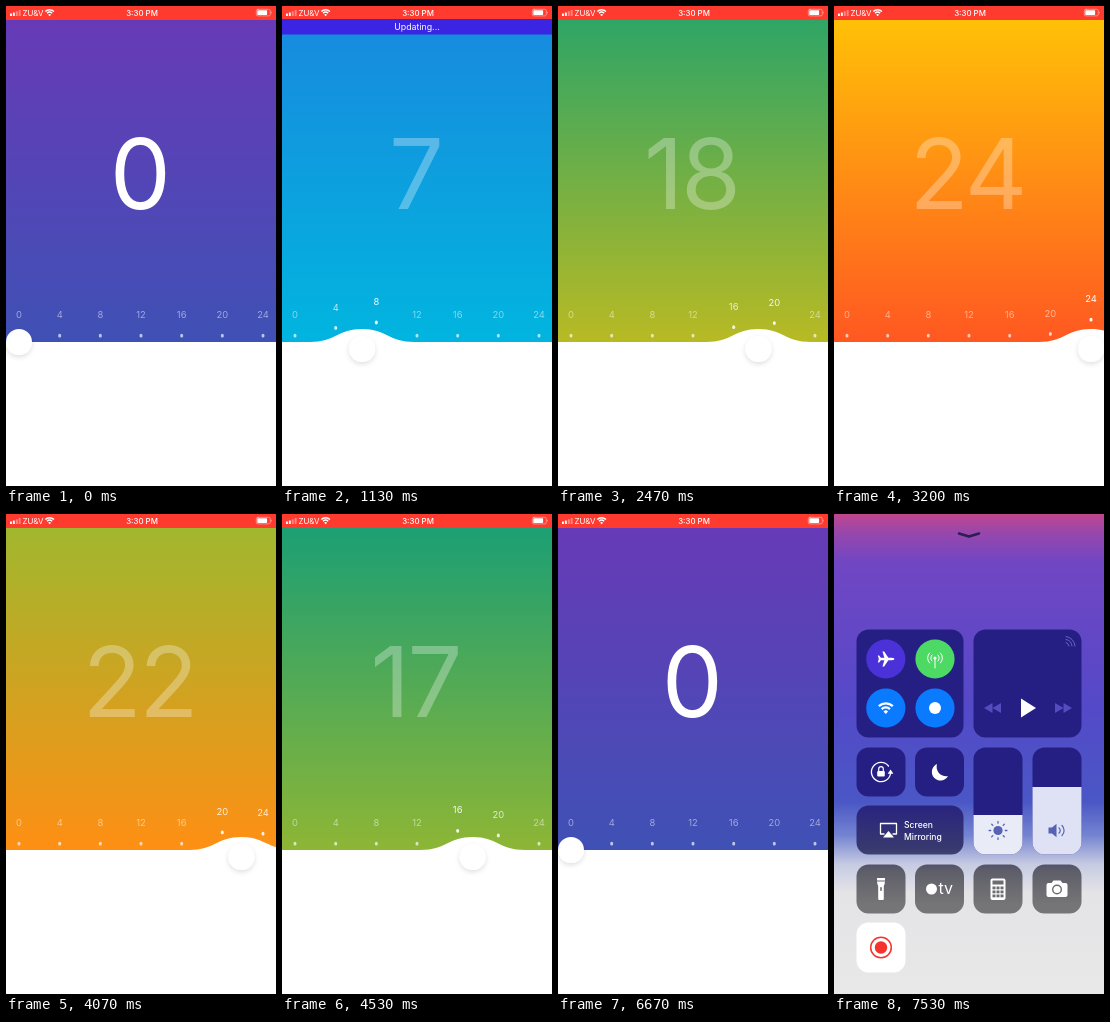
Animation, 270 px wide and 480 px high, one loop 7.59 s. Source, as an HTML page:

```html
<!DOCTYPE html>
<html lang="en">
<head>
<meta charset="utf-8">
<title>Liquid slider</title>
<style>
html, body { margin: 0; height: 100%; overflow: hidden; background: #fff; }
svg { display: block; width: 100vw; height: 100vh; }
text { font-family: Inter, Roboto, sans-serif; fill: #fff; }
.mid { text-anchor: middle; }
#value { font-size: 97px; font-weight: 400; letter-spacing: -2.5px; }
#ticks text { font-size: 9.4px; }
.bar { font-size: 7.9px; }
.tile { fill: url(#glass); }
.gray { fill: #6c6c70; }
.w { fill: #fff; }
.line { fill: none; stroke: #fff; stroke-width: 1.3; stroke-linecap: round; stroke-linejoin: round; }
.ink { fill: #5663b4; }
.dim { fill: #554bbd; }
</style>
</head>
<body>
<svg viewBox="0 0 270 480" preserveAspectRatio="none">
  <defs>
    <linearGradient id="sky" gradientUnits="userSpaceOnUse" x1="0" y1="13" x2="0" y2="338">
      <stop id="top"/><stop id="low" offset="1"/>
    </linearGradient>
    <linearGradient id="veil" x2="0" y2="1">
      <stop stop-color="#c0468e"/>
      <stop offset=".04" stop-color="#9747ac"/>
      <stop offset=".1" stop-color="#7146c3"/>
      <stop offset=".4" stop-color="#5449c8"/>
      <stop offset=".6" stop-color="#4a57c5"/>
      <stop offset=".67" stop-color="#7584d1"/>
      <stop offset=".73" stop-color="#c6cbe2"/>
      <stop offset=".79" stop-color="#e4e4e7"/>
      <stop offset="1" stop-color="#e8e8e8"/>
    </linearGradient>
    <linearGradient id="glass" gradientUnits="userSpaceOnUse" x1="0" y1="280" x2="0" y2="390">
      <stop stop-color="#251f84"/>
      <stop offset=".5" stop-color="#38396f"/>
      <stop offset=".7" stop-color="#5e5e69"/>
      <stop offset="1" stop-color="#757577"/>
    </linearGradient>
    <filter id="shade" x="-60%" y="-60%" width="220%" height="220%">
      <feDropShadow dx="0" dy="2" stdDeviation="2.6" flood-opacity=".13"/>
    </filter>
    <clipPath id="bright"><rect x="139.5" y="233.5" width="49" height="107" rx="12"/></clipPath>
    <clipPath id="sound"><rect x="198.5" y="233.5" width="49" height="107" rx="12"/></clipPath>
    <g id="wifi">
      <path class="line" style="stroke-width:2.4;stroke-linecap:butt" d="M-7.6-2A11 11 0 0 1 7.6-2M-4.5 1.2A6.5 6.5 0 0 1 4.5 1.2"/>
      <path class="w" d="M0 6.6L-2.5 3.8A3.4 3.4 0 0 1 2.5 3.8Z"/>
    </g>
  </defs>

  <rect width="270" height="340" fill="url(#sky)"/>
  <text id="value" class="mid" x="133.2" y="203"></text>
  <g id="ticks"></g>
  <path id="wave" class="w"/>
  <circle id="knob" class="w" r="13" filter="url(#shade)"/>

  <rect width="270" height="14" fill="#ff3b30"/>
  <path class="w" d="M4 7.6h1.9v2.4h-1.9zM6.9 6.4h1.9v3.6h-1.9z"/>
  <path class="w" opacity=".4" d="M9.8 5.2h1.9v4.8h-1.9zM12.7 4h1.9v6h-1.9z"/>
  <text class="bar" x="16.5" y="9.8">ZU&amp;V</text>
  <use href="#wifi" transform="translate(43.6 6.6) scale(.57)"/>
  <text class="bar mid" x="136" y="9.8" font-weight="500">3:30 PM</text>
  <rect class="line" x="250.3" y="3.3" width="14" height="6.6" rx="1.6" style="stroke-width:.6" opacity=".7"/>
  <rect class="w" x="251.3" y="4.3" width="9.8" height="4.6" rx=".7"/>
  <path class="w" d="M265 5.4q1.4 1.2 0 2.4z" opacity=".7"/>
  <g id="update">
    <rect y="13" width="270" height="15.5" fill="#3a25e2"/>
    <text class="mid" x="135" y="23.8" font-size="8.8">Updating...</text>
  </g>

  <g id="panel">
    <rect width="270" height="480" fill="url(#veil)"/>
    <g id="tiles">
      <path d="M125 19.5L135 22.6L145 19.5" fill="none" stroke="#2c1d55" stroke-width="2.6" stroke-linecap="round" stroke-linejoin="round"/>
      <g class="tile">
        <rect x="22.5" y="115.5" width="107" height="108" rx="12"/>
        <rect x="139.5" y="115.5" width="108" height="108" rx="12"/>
        <rect x="22.5" y="233.5" width="49" height="49" rx="12"/>
        <rect x="81" y="233.5" width="49" height="49" rx="12"/>
        <rect x="22.5" y="291.5" width="107" height="49" rx="12"/>
        <rect x="22.5" y="350.5" width="49" height="49" rx="12"/>
        <rect x="81" y="350.5" width="49" height="49" rx="12"/>
        <rect x="139.5" y="350.5" width="49" height="49" rx="12"/>
        <rect x="198.5" y="350.5" width="49" height="49" rx="12"/>
      </g>
      <g fill="#251f84">
        <rect x="139.5" y="233.5" width="49" height="107" rx="12"/>
        <rect x="198.5" y="233.5" width="49" height="107" rx="12"/>
      </g>
      <rect class="w" x="22.5" y="408.5" width="49" height="50" rx="12"/>

      <circle cx="51.8" cy="145" r="19.6" fill="#4a32d8"/>
      <circle cx="101" cy="145" r="19.6" fill="#4cd964"/>
      <circle cx="51.8" cy="194" r="19.6" fill="#0a7aff"/>
      <circle cx="101" cy="194" r="19.6" fill="#0a7aff"/>
      <path class="w" transform="translate(51.8 145) scale(.8)" d="M11 0Q10-1.7 7-1.7H3.2L-2-9.5H-4.2L-1.8-1.7H-6.2L-8.3-4.4H-10L-8.7 0L-10 4.4H-8.3L-6.2 1.7H-1.8L-4.2 9.5H-2L3.2 1.7H7Q10 1.7 11 0Z"/>
      <g transform="translate(101 145)">
        <path class="line" style="stroke-width:1" d="M0-1V9M-3-4A4.2 4.2 0 0 0-3 2M3-4A4.2 4.2 0 0 1 3 2M-5.4-6A7 7 0 0 0-5.4 4M5.4-6A7 7 0 0 1 5.4 4"/>
        <circle class="w" cy="-1" r="1.6"/>
      </g>
      <use href="#wifi" transform="translate(51.8 194) scale(.92)"/>
      <circle class="w" cx="101" cy="194" r="6"/>

      <path class="w" d="M187 184.5L202 194L187 203.5Z"/>
      <path class="dim" d="M158.5 189V199L150 194ZM167 189V199L158.5 194ZM221 189V199L229.5 194ZM229.5 189V199L238 194Z"/>
      <path class="line" style="stroke:#6b60c8;stroke-width:1" d="M232 128.5A4 4 0 0 1 235 132M232 125.5A7 7 0 0 1 238 132M232 122.5A10 10 0 0 1 241 132"/>

      <g transform="translate(47 258)">
        <path class="line" d="M7.5-6A9.6 9.6 0 1 0 9.6 1"/>
        <path class="w" d="M6.6 1.8L12.4 1.8L9.6-2.4Z"/>
        <rect class="w" x="-3.8" y="-1" width="7.6" height="5.6" rx="1"/>
        <path class="line" style="stroke-width:1.2" d="M-2.3-1V-3A2.3 2.3 0 0 1 2.3-3V-1"/>
      </g>
      <path class="w" d="M103 250A8.6 8.6 0 1 0 114 262A9.4 9.4 0 0 1 103 250Z"/>

      <path class="line" d="M50 320H46.5V309.5H62.5V320H59"/>
      <path class="w" d="M54.5 317L60 323.5H49Z"/>
      <g font-size="8.6" font-weight="500"><text x="70" y="313.5">Screen</text><text x="70" y="325.5">Mirroring</text></g>

      <rect x="139" y="301" width="50" height="40" fill="#e9ebf7" clip-path="url(#bright)"/>
      <rect x="198" y="273" width="50" height="68" fill="#dfe2f5" clip-path="url(#sound)"/>
      <circle class="ink" cx="164" cy="316.5" r="4.6"/>
      <g id="rays" stroke="#5663b4" stroke-width="1.3" stroke-linecap="round"></g>
      <path class="ink" d="M214.5 313.5H218L222.5 309.8V323.2L218 319.5H214.5Z"/>
      <path class="line" style="stroke:#5663b4;stroke-width:1.2" d="M225 313.8A4 4 0 0 1 225 319.2M228 311.5A7 7 0 0 1 228 321.5"/>

      <path class="w" d="M43 364H51V366.5H43ZM43 367.5H51Q50.8 370.5 49.8 372V385Q49.8 386 48.8 386H45.2Q44.2 386 44.2 385V372Q43.2 370.5 43 367.5Z"/>
      <rect class="gray" x="46.2" y="373" width="1.6" height="4" rx=".8"/>
      <circle class="w" cx="97.5" cy="375" r="5.5"/>
      <text x="104.5" y="380" font-size="16">tv</text>
      <rect class="w" x="156.5" y="364.5" width="15" height="21.5" rx="2"/>
      <rect class="gray" x="158.5" y="366.5" width="11" height="4"/>
      <g id="keys" class="gray"></g>
      <path class="w" d="M214.5 369H217.5L219.5 366.5H226.5L228.5 369H231.5Q233.5 369 233.5 371V381Q233.5 383 231.5 383H214.5Q212.5 383 212.5 381V371Q212.5 369 214.5 369Z"/>
      <circle class="gray" cx="223" cy="375.5" r="5"/>
      <circle class="w" cx="223" cy="375.5" r="3.6"/>
      <circle cx="47" cy="433.5" r="10.3" fill="none" stroke="#f5332c" stroke-width="1.5"/>
      <circle cx="47" cy="433.5" r="6.2" fill="#f5332c"/>
    </g>
  </g>
</svg>
<script>
const LOOP = 7590, LEFT = 13, SPAN = 244, BASE = 336, REACH = 52;
const $ = id => document.getElementById(id);
const set = (el, attrs) => { for (const k in attrs) el.setAttribute(k, attrs[k]); return el; };
const add = (parent, tag, attrs) =>
  parent.appendChild(set(document.createElementNS('http://www.w3.org/2000/svg', tag), attrs));
const mix = (a, b, u) => a + (b - a) * u;
const ramp = (t, a, b) => {
  const u = Math.min(1, Math.max(0, (t - a) / (b - a)));
  return u * u * (3 - 2 * u);
};

// Each stop is four hours apart; the lower colour runs one stop ahead.
const hues = ['673AB7', '3F51B5', '03A9F4', '00BCD4', '009688', '4CAF50', 'FFC107', 'FF5722']
  .map(h => [0, 2, 4].map(i => parseInt(h.slice(i, i + 2), 16)));
const hue = p => {
  const i = Math.min(hues.length - 2, Math.floor(p));
  return `rgb(${hues[i].map((c, k) => Math.round(mix(c, hues[i + 1][k], p - i)))})`;
};

// Drag path: time, x
const path = [[370, 13], [1130, 80], [2470, 200.4], [3150, 257], [3620, 257], [4530, 190.8], [5400, 62], [5650, 13]];
const slopes = path.map((p, i) => {
  if (!i || i === path.length - 1) return 0;
  const [a, b] = [path[i - 1], path[i + 1]];
  const s = (p[1] - a[1]) / (p[0] - a[0]), r = (b[1] - p[1]) / (b[0] - p[0]);
  return s * r > 0 ? 2 * s * r / (s + r) : 0;
});
function dragX(t) {
  const i = path.findIndex(p => t < p[0]);
  if (i < 1) return LEFT;
  const [t0, x0] = path[i - 1], [t1, x1] = path[i], d = t1 - t0, u = (t - t0) / d, v = 1 - u;
  return x0 * (1 + 2 * u) * v * v + x1 * u * u * (3 - 2 * u)
    + d * u * v * (slopes[i - 1] * v - slopes[i] * u);
}

const ticks = Array.from({ length: 7 }, (_, i) => {
  const x = LEFT + SPAN * i / 6;
  const g = add($('ticks'), 'g', {});
  add(g, 'text', { x, y: 312.4, class: 'mid' }).textContent = i * 4;
  add(g, 'ellipse', { cx: x, cy: 329.7, rx: 1.5, ry: 1.9, class: 'w' });
  return { x, g };
});
for (let i = 0; i < 8; i++)
  add($('rays'), 'path', { d: 'M0-7.3V-8.9', transform: `translate(164 316.5) rotate(${i * 45})` });
for (let i = 0; i < 9; i++)
  add($('keys'), 'rect', { x: 158.5 + i % 3 * 4, y: 372.5 + Math.floor(i / 3) * 4, width: 3, height: 2.8 });

function draw(t) {
  const x = dragX(t), press = ramp(t, 260, 430) * (1 - ramp(t, 5640, 5800));
  const hour = (x - LEFT) / SPAN * 24, peak = BASE - 13 * press;
  set($('top'), { 'stop-color': hue(hour / 4) });
  set($('low'), { 'stop-color': hue(hour / 4 + 1) });
  $('value').textContent = Math.round(hour);
  set($('value'), { opacity: mix(1, 0.3, press) });

  for (const { x: tx, g } of ticks) {
    const d = Math.min(1, Math.abs(tx - x) / REACH);
    const lift = press * (1 + Math.cos(Math.PI * d)) / 2;
    set(g, { transform: `translate(0 ${-16 * lift})` });
    set(g.firstChild, { opacity: mix(0.5, 1, lift) });
    set(g.lastChild, { opacity: mix(0.68, 1, lift) });
  }

  set($('wave'), { d: `M-60 480V${BASE}H${x - REACH}C${x - 27} ${BASE} ${x - 24} ${peak} ${x} ${peak}`
    + `S${x + 27} ${BASE} ${x + REACH} ${BASE}H330V480Z` });
  set($('knob'), { cx: x, cy: BASE + 7 * press });
  set($('update'), { opacity: t < 870 ? 0 : 1 - ramp(t, 1330, 1580) });

  set($('panel'), { opacity: ramp(t, 6950, 7350) });
  set($('tiles'), { transform: `translate(0 ${70 * (1 - ramp(t, 6950, 7500))})` });
}

const start = performance.now();
(function tick() {
  draw((performance.now() - start) % LOOP);
  requestAnimationFrame(tick);
})();
</script>
</body>
</html>
```
